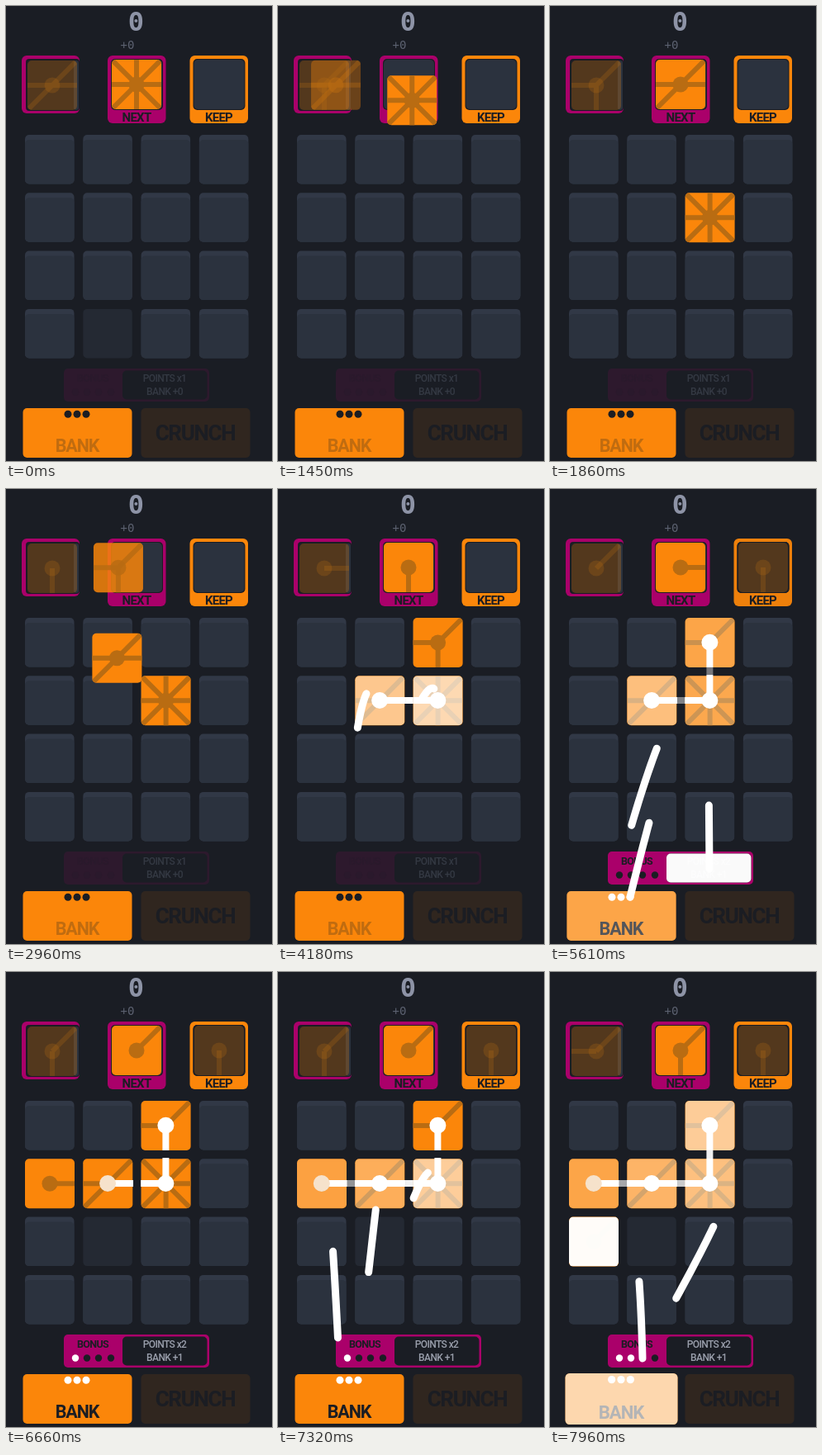
These frames come from a looping animation (322x551 px, 8000 ms). An HTML page with a canvas:

```html
<!DOCTYPE html>
<html lang="en">
<head>
<meta charset="utf-8">
<title>Tile chain puzzle</title>
<style>
  html, body { margin: 0; width: 100%; height: 100%; overflow: hidden; background: #1a1d24; }
  canvas { display: block; width: 322px; height: 551px; }
</style>
</head>
<body>
<canvas id="stage"></canvas>
<script>
const W = 322, H = 551, LOOP = 8000;
const ORANGE = '#fb860a', SPOKE = '#b96c12', MAGENTA = '#aa006a';
const BG = '#1a1d24', SLOT = '#2b323e', RIM = '#313846', INK = '#1b1d23', WHITE = '#fff';
const UI = 'Roboto, sans-serif', MONO = '"DejaVu Sans Mono", monospace';
const FLY = 410, SLIDE = 356, SHOT = 570, TAIL = 0.22, FADE = 670;

const canvas = document.getElementById('stage');
const ctx = canvas.getContext('2d');
const ratio = window.devicePixelRatio || 1;
canvas.width = W * ratio;
canvas.height = H * ratio;

const clamp = v => Math.max(0, Math.min(1, v));
const lerp = (a, b, k) => a + (b - a) * k;
const cellX = col => 23 + col * 70.3;
const cellY = row => 156 + row * 70.3;
const center = (col, row) => [cellX(col) + 29.8, cellY(row) + 29.7];

const DIRS = {
  N: [0, -1], NE: [1, -1], E: [1, 0], SE: [1, 1],
  S: [0, 1], SW: [-1, 1], W: [-1, 0], NW: [-1, -1]
};
const QUEUE = [26, 66], NEXT = [128, 65], KEEP = [228, 65];
const NEVER = 1e6;

// Each tile leaves the NEXT slot at `at`; without a cell it goes to KEEP.
const tiles = [
  { spokes: 'N NE E SE S SW W NW', at: 1402, cell: [2, 1] },
  { spokes: 'W E NE SW', at: 2682, cell: [1, 1] },
  { spokes: 'W S NE', at: 3422, cell: [2, 0] },
  { spokes: 'S', at: 4640 },
  { spokes: 'E', at: 6000, cell: [0, 1] },
  { spokes: 'NE', at: 7400, cell: [0, 2] },
  { spokes: 'S NE', at: NEVER },
  { spokes: 'W NE', at: NEVER }
];

// Launch time, column, row, bend x, target.
const BANK_DOTS = [75, 86, 97], BONUS_DOTS = [84, 98, 112, 127];
const bankDot = i => ({ kind: 'bank', i, x: BANK_DOTS[i], y: 494 });
const bonusDot = i => ({ kind: 'bonus', i, x: BONUS_DOTS[i], y: 468 });
const points = { kind: 'points', x: 193, y: 460 };
const shots = [
  [3870, 1, 1, 98, bankDot(0)],
  [3970, 2, 1, 185, bankDot(1)],
  [4200, 2, 0, 170, bankDot(2)],
  [4415, 1, 1, 150, bankDot(1)],
  [4900, 2, 1, 200, points],
  [4983, 2, 0, 190, points],
  [5006, 2, 1, 174, bankDot(2)],
  [5128, 2, 1, 156, bankDot(0)],
  [5620, 2, 0, 150, bonusDot(0)],
  [6800, 0, 1, 60, bankDot(0)],
  [6870, 1, 1, 130, bonusDot(1)],
  [7045, 2, 1, 180, bankDot(2)],
  [7370, 0, 1, 105, bonusDot(2)],
  [7470, 2, 1, 276, bonusDot(2)]
].map(([at, col, row, bend, to]) => ({ at, col, row, bend, to, hit: at + SHOT * (1 + TAIL) }));

// Chain pulses that only light a cell.
const pulses = [
  [5108, 2, 0], [5255, 1, 1], [7458, 0, 1], [7545, 1, 1],
  [7612, 2, 1], [7680, 2, 0], [7945, 0, 2]
].map(([at, col, row]) => ({ at, col, row }));

const nodes = [
  { cell: [0, 1], from: 6800, end: true },
  { cell: [1, 1], from: 3870, end: true },
  { cell: [2, 1], from: 3970 },
  { cell: [2, 0], from: 4200 }
];
const links = [[0, 1], [1, 2], [2, 3]];

const hovers = [[0, 740, 1, 3], [740, 1450, 2, 1], [2370, 2730, 1, 1], [6000, 8000, 1, 2]];

const glow = (t, times) =>
  times.reduce((k, at) => t >= at ? Math.max(k, 1 - (t - at) / FADE) : k, 0);
const cellGlow = (t, [col, row]) =>
  glow(t, [...shots, ...pulses].filter(s => s.col === col && s.row === row).map(s => s.at));
const hits = kind => shots.filter(s => s.to.kind === kind).map(s => s.hit);
const dotLit = (t, kind, i) => shots.some(s => s.to.kind === kind && s.to.i === i && t >= s.hit);

function box(x, y, w, h, r, fill) {
  ctx.beginPath();
  ctx.roundRect(x, y, w, h, r);
  ctx.fillStyle = fill;
  ctx.fill();
}

function dot(x, y, r, fill) {
  ctx.beginPath();
  ctx.arc(x, y, r, 0, Math.PI * 2);
  ctx.fillStyle = fill;
  ctx.fill();
}

function line(x1, y1, x2, y2, width, color) {
  ctx.beginPath();
  ctx.moveTo(x1, y1);
  ctx.lineTo(x2, y2);
  ctx.lineWidth = width;
  ctx.strokeStyle = color;
  ctx.stroke();
}

function label(text, x, y, size, color, weight = 700, family = UI) {
  ctx.font = `${weight} ${size}px ${family}`;
  ctx.letterSpacing = family === UI ? `${-size * 0.05}px` : '0px';
  ctx.textAlign = 'center';
  ctx.fillStyle = color;
  ctx.fillText(text, x, y);
}

function withAlpha(alpha, draw) {
  ctx.save();
  ctx.globalAlpha *= alpha;
  draw();
  ctx.restore();
}

function drawTile(spokes, x, y, alpha, white = 0) {
  ctx.save();
  ctx.translate(x, y);
  ctx.globalAlpha = alpha;
  box(0, 0, 60, 60, 5, ORANGE);
  ctx.clip();
  // One combined path keeps crossing spokes even when the tile is faint.
  ctx.beginPath();
  for (const name of spokes.split(' ')) {
    const [dx, dy] = DIRS[name];
    ctx.moveTo(30, 30);
    ctx.lineTo(30 + dx * 34, 30 + dy * 34);
  }
  ctx.lineWidth = 6;
  ctx.strokeStyle = SPOKE;
  ctx.stroke();
  dot(30, 30, 9.5, SPOKE);
  if (white) withAlpha(white, () => box(0, 0, 60, 60, 5, WHITE));
  ctx.restore();
}

function drawGrid(t) {
  const hover = hovers.find(([a, b]) => t >= a && t < b) || [];
  for (let row = 0; row < 4; row++) {
    for (let col = 0; col < 4; col++) {
      const x = cellX(col), y = cellY(row);
      if (hover[2] === col && hover[3] === row) {
        box(x, y, 59.5, 59.5, 5, '#242933');
      } else {
        box(x, y, 59.5, 59.5, 5, RIM);
        box(x, y + 6, 59.5, 53.5, 5, SLOT);
      }
    }
  }
}

function drawSlots(t) {
  box(19, 60, 70, 70, 6, MAGENTA);
  box(24, 64, 65, 63, 4, BG);
  box(82, 66, 6, 60, 3, SLOT);

  const holder = (x, color, text, alpha) => {
    withAlpha(alpha, () => box(x, 60, 70.5, 82, 6, color));
    box(x + 4, 64, 63, 62, 5, INK);
    box(x + 5, 65, 61, 60, 5, SLOT);
    label(text, x + 35, 140, 15, INK);
  };
  holder(123, MAGENTA, 'NEXT', 1);
  holder(222.5, ORANGE, 'KEEP', t > 4640 && t < 6050 ? 0.94 : 1);
}

function drawTiles(t) {
  tiles.forEach((tile, i) => {
    const born = i > 1 ? tiles[i - 2].at : 0;
    const slideAt = i > 0 ? tiles[i - 1].at : -NEVER;
    if (t < born) return;
    const slide = clamp((t - slideAt) / SLIDE);
    const fly = clamp((t - tile.at) / FLY);
    const goal = tile.cell ? [cellX(tile.cell[0]), cellY(tile.cell[1])] : KEEP;
    const [from, to, k] = fly > 0 ? [NEXT, goal, fly] : [QUEUE, NEXT, slide];
    const alpha = fly > 0 && !tile.cell ? lerp(1, 0.25, fly) : lerp(0.25, 1, slide);
    const white = tile.cell && fly === 1 ? cellGlow(t, tile.cell) : 0;
    const [x, y] = [0, 1].map(axis => lerp(from[axis], to[axis], k));
    if (!tile.cell && fly === 1) box(226.5, 64, 63, 62, 5, BG);
    drawTile(tile.spokes, x, y, alpha, white);
  });
}

function drawChain(t) {
  for (const [a, b] of links) {
    const p = nodes[a], q = nodes[b];
    if (t < Math.max(p.from, q.from)) continue;
    const [x1, y1] = center(...p.cell), [x2, y2] = center(...q.cell);
    const at = k => [lerp(x1, x2, k), lerp(y1, y2, k)];
    line(...at(0), ...at(0.44), 8, WHITE);
    line(...at(0.57), ...at(1), 8, WHITE);
    withAlpha(clamp(cellGlow(t, q.cell) * 1.6), () => line(...at(0.44), ...at(0.57), 8, WHITE));
  }
  for (const { cell, from, end } of nodes) {
    if (t < from) continue;
    const faint = end && cellGlow(t, cell) < 0.3;
    dot(...center(...cell), 10, faint ? '#f6e2cb' : WHITE);
  }
}

function drawBonus(t) {
  withAlpha(lerp(0.13, 1, clamp((t - 5100) / 300)), () => {
    box(70, 439, 176, 40, 5, MAGENTA);
    label('BONUS', 105, 455, 12.5, INK);
    BONUS_DOTS.forEach((x, i) => dot(x, 467.5, 4.2, dotLit(t, 'bonus', i) ? WHITE : INK));
  });
  box(141, 441.5, 102.5, 35, 5, BG);
  const [first] = hits('points');
  const color = t < first ? '#343943' : '#9a9fac';
  label(t < first ? 'POINTS x1' : 'POINTS x2', 192, 455, 12, color, 500);
  label(t < first ? 'BANK +0' : 'BANK +1', 192, 471, 12, color, 500);
  const k = glow(t, hits('points'));
  if (k) withAlpha(k, () => box(141, 441.5, 102.5, 35, 5, WHITE));
}

function drawButtons(t) {
  box(163.5, 487, 132, 60, 5, '#30261f');
  label('CRUNCH', 229, 526, 26, INK);

  const k = glow(t, hits('bank'));
  const ready = dotLit(t, 'bank', 2);
  const scale = 1 + 0.1 * k ** 3;
  ctx.save();
  ctx.translate(86.5, 517);
  ctx.scale(scale, scale);
  ctx.translate(-86.5, -517);
  box(20.5, 487, 132, 60, 5, ORANGE);
  label('BANK', 86, 540, 21.5, ready ? INK : '#c06c10');
  if (k) withAlpha(k, () => box(20.5, 487, 132, 60, 5, WHITE));
  BANK_DOTS.forEach((x, i) => dot(x, 494.3, 4.5, dotLit(t, 'bank', i) ? WHITE : INK));
  ctx.restore();
}

function drawShots(t) {
  ctx.lineWidth = 9;
  ctx.lineCap = ctx.lineJoin = 'round';
  ctx.strokeStyle = WHITE;
  for (const { at, col, row, bend, to } of shots) {
    const head = (t - at) / SHOT;
    if (head <= 0 || head >= 1 + TAIL) continue;
    const [x, y] = center(col, row);
    const a = Math.max(0, head - TAIL), b = Math.min(1, head);
    const curve = (p, c, q, k) => (1 - k) ** 2 * p + 2 * k * (1 - k) * c + k * k * q;
    ctx.beginPath();
    for (let i = 0; i <= 12; i++) {
      const k = lerp(a, b, i / 12);
      ctx.lineTo(curve(x, bend, to.x, k), curve(y, y - 76, to.y, k));
    }
    ctx.stroke();
  }
  ctx.lineCap = 'butt';
}

function draw(t) {
  ctx.setTransform(ratio, 0, 0, ratio, 0, 0);
  ctx.fillStyle = BG;
  ctx.fillRect(0, 0, W, H);
  label('0', 157.5, 29.5, 32, '#8d93a6', 700, MONO);
  label('+0', 147, 51.5, 14, '#5c6170', 400, MONO);
  drawGrid(t);
  drawSlots(t);
  drawBonus(t);
  drawButtons(t);
  drawTiles(t);
  drawChain(t);
  drawShots(t);
}

const start = performance.now();
function tick() {
  draw((performance.now() - start) % LOOP);
  requestAnimationFrame(tick);
}
tick();
</script>
</body>
</html>
```
